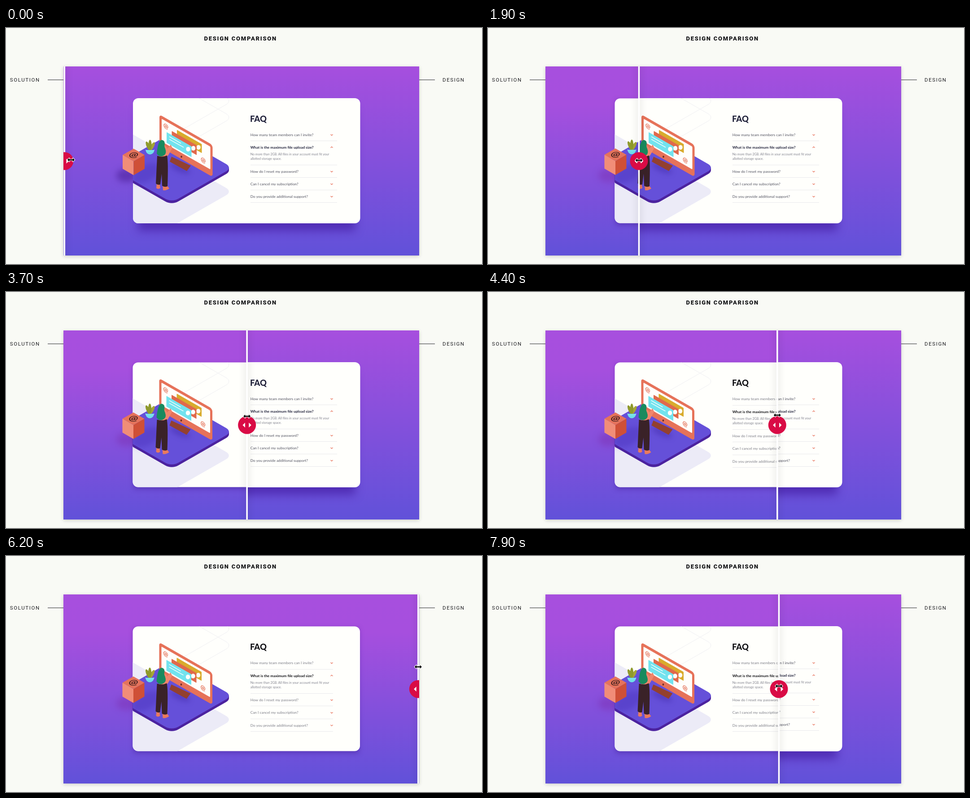
Write an HTML page with a canvas that moves like this. It is 1061 px wide and 528 px high and loops after 8 s.

```html
<!DOCTYPE html>
<html lang="en">
<head>
<meta charset="utf-8">
<title>Design comparison</title>
<style>
  html, body { margin: 0; width: 100%; height: 100%; overflow: hidden; background: #f9faf5; }
  canvas { display: block; }
</style>
</head>
<body>
<canvas id="stage" width="1061" height="528"></canvas>
<script>
const LOOP = 8000, STEP = 100;
const BOX = { x: 128, y: 86, w: 793, h: 423 };
const SLOPE = 0.575; // isometric rise per pixel

// Drag path: time, slider x, pointer y
const DRAG = [
  [700, 130.3, 295], [1900, 336.5, 296], [2900, 456.2, 281.5], [3400, 491, 279],
  [4400, 644.8, 275.5], [5400, 860.4, 254.5], [6000, 918.8, 248], [6200, 918.8, 248], [7800, 648.5, 291]
];

const DESIGN = {
  inset: 0, rowStep: 28, ruleWidth: 193, flatTop: 0,
  shadow: { color: 'rgba(58,18,150,.55)', blur: 10, drop: 22 }, blob: 'rgba(72,30,150,.55)',
  title: '#1f2039', text: '#50515f'
};
const SOLUTION = {
  inset: 0.5, rowStep: 28.4, ruleWidth: 184, flatTop: 0.2,
  shadow: { color: 'rgba(50,15,130,.4)', blur: 6, drop: 5 }, blob: 'rgba(125,50,180,.5)',
  title: '#101014', text: '#7b7c86'
};
const QUESTIONS = [
  'How many team members can I invite?', 'What is the maximum file upload size?',
  'How do I reset my password?', 'Can I cancel my subscription?', 'Do you provide additional support?'
];
const ANSWER = ['No more than 2GB. All files in your account must fit your', 'allotted storage space.'];

const stage = document.getElementById('stage');

function layer() {
  const c = document.createElement('canvas');
  c.width = stage.width;
  c.height = stage.height;
  return c;
}

function poly(g, color, pts) {
  g.beginPath();
  pts.forEach(p => g.lineTo(...p));
  g.fillStyle = color;
  g.fill();
}

function path(g, d, fill, stroke, width = 1) {
  const p = new Path2D(d);
  if (fill) { g.fillStyle = fill; g.fill(p); }
  if (stroke) { g.strokeStyle = stroke; g.lineWidth = width; g.stroke(p); }
}

function oval(g, color, x, y, rx, ry = rx, turn = 0) {
  g.beginPath();
  g.ellipse(x, y, rx, ry, turn, 0, Math.PI * 2);
  g.fillStyle = color;
  g.fill();
}

function write(g, text, x, y, font, color, spacing = 0) {
  g.font = font;
  g.fillStyle = color;
  g.letterSpacing = spacing + 'px';
  g.fillText(text, x, y);
}

function blurred(g, radius, paint) {
  g.save();
  g.filter = `blur(${radius}px)`;
  paint();
  g.restore();
}

// Rounded square lying on the ground, placed by its right corner
function slab(x, y, size, r = 14) {
  const square = new Path2D(), p = new Path2D();
  square.roundRect(0, 0, size, size, r);
  p.addPath(square, new DOMMatrix([1, SLOPE, -1, SLOPE, x - size, y - size * SLOPE]));
  return p;
}

// Upright panel facing left
function panel(g, color, x, y, w, h, r = 1) {
  g.save();
  g.transform(1, SLOPE, 0, 1, x, y);
  g.beginPath();
  g.roundRect(0, 0, w, h, r);
  g.fillStyle = color;
  g.fill();
  g.restore();
}

function atSign(g, color, size, ...matrix) {
  g.save();
  g.transform(...matrix);
  g.textAlign = 'center';
  g.textBaseline = 'middle';
  write(g, '@', 0, 0, `bold ${size}px Lato, sans-serif`, color);
  g.restore();
}

function drawGround(g) {
  g.fillStyle = '#ecebf7';
  g.fill(slab(505, 366, 300));
  g.strokeStyle = '#eeeef1';
  for (const y of [200, 163]) g.stroke(slab(505, y, 300));
  g.fillStyle = '#4c239f';
  for (let d = 6; d > 0; d--) g.fill(slab(505, 312.5 + d, 135.5));
  g.fillStyle = '#6550d9';
  g.fill(slab(505, 312.5, 135.5));
  blurred(g, 6, () => {
    oval(g, 'rgba(70,45,180,.35)', 312, 325, 34, 18, -0.5);
    oval(g, 'rgba(60,35,160,.4)', 388, 314, 24, 8, 0.4);
  });
}

function drawMonitor(g) {
  poly(g, '#93402f', [[369, 288], [412, 308], [403, 320], [365, 299]]);
  panel(g, '#e67259', 342, 193.5, 118.5, 71.5, 6);
  panel(g, '#fffefb', 347, 203, 108.5, 51, 2);
  ['#d9ab2c', '#e0694c', '#72e3ee'].forEach((color, i) => {
    const x = 381 - i * 11.5;
    panel(g, color, x, 228 + i * 2.5, 55.5, 20 + i * 2);
    oval(g, '#fffefb', x + 48, 267 + i * 2, 4.7, 5.3);
  });
  path(g, 'M364 243 l26 15 M364 249 l32 18', null, '#e9fbfb', 1.6);
  oval(g, '#6b2c25', 391, 288, 1.8, 2.3);
  for (const [x, y] of [[356.3, 220], [439.5, 296]]) atSign(g, '#e2694f', 14, 0.95, 0.5, 0, 1, x, y);
}

function drawPlant(g) {
  for (const lean of [-0.4, 0.5, 0]) {
    const reach = 12 - Math.abs(lean) * 3;
    oval(g, lean > 0 ? '#a5a637' : '#8f9a2c', 321 + Math.sin(lean) * reach, 274 - Math.cos(lean) * reach, 3.6, reach, lean);
  }
  path(g, 'M311.5 273 A9.5 10 0 0 0 330.5 273 Z', '#6fdfe9');
  path(g, 'M311.5 272.5 A9.5 3 0 0 0 330.5 272.5', null, '#8aeaf1', 1.4);
}

function drawWoman(g) {
  path(g, 'M336 347 h6 l2 11 q-5 4 -9 0 Z M349 351 h9 l6 8 q-6 5 -14 4 Z', '#e97a5e');
  path(g, 'M350 263 q8 1 10 7 l7 -9 l4 7 l-9 16 l-5 6 h-16 Z', '#f0866c');
  path(g, 'M337 286 Q349 290 359 285 Q362 300 360 354 Q354 357 348 353 L347 326 L344 350 Q338 352 334 348 Z', '#3a2228');
  path(g, 'M347 250.5 Q354 251 354 259 Q352 264 355 270 Q359 281 352 285 Q343 291 336 281 Q339 251 347 250.5 Z', '#198a5e');
}

function drawCube(g, x, y, half, height) {
  const mid = y + half * SLOPE, front = y + 2 * half * SLOPE;
  poly(g, '#e5735b', [[x, y], [x + half, mid], [x, front], [x - half, mid]]);
  for (const [side, color] of [[-1, '#f18d78'], [1, '#cf5037']]) {
    const edge = x + side * half;
    poly(g, color, [[edge, mid], [x, front], [x, front + height], [edge, mid + height]]);
  }
  atSign(g, '#40201f', 25, 1, 0, -0.12, 0.62, x, mid);
}

function drawFaq(g, s) {
  write(g, 'FAQ', 544, 210, '800 18.5px Lato, sans-serif', s.title);
  let y = 239 + s.inset / 2;
  QUESTIONS.forEach((question, i) => {
    const open = i === 1, d = open ? -1 : 1;
    write(g, question, 544.7, y + 3, `${open ? 'bold' : 'normal'} 8.3px Lato, sans-serif`, open ? s.title : s.text);
    path(g, `M723.5 ${y - d} l2.5 ${2.3 * d} l2.5 ${-2.3 * d}`, null, '#e97b65', 1.3);
    if (open) {
      ANSWER.forEach((line, j) => write(g, line, 544.7, y + 18 + j * 10, '7.08px Lato, sans-serif', '#82838f'));
      y += 26;
    }
    g.fillStyle = '#e9e9ec';
    g.fillRect(545, Math.round(y + 13.4), s.ruleWidth, 1);
    y += s.rowStep;
  });
}

function buildScene(s) {
  const c = layer(), g = c.getContext('2d');
  const fill = g.createLinearGradient(0, BOX.y, 0, BOX.y + BOX.h);
  fill.addColorStop(0, '#a74fde');
  fill.addColorStop(s.flatTop, '#a64fde');
  fill.addColorStop(1, '#6151d9');
  g.fillStyle = fill;
  g.fillRect(BOX.x, BOX.y, BOX.w, BOX.h);

  const x = 283 - s.inset, y = 157 + s.inset, w = 506.5, h = 280 - 2 * s.inset;
  const card = new Path2D();
  card.roundRect(x, y, w, h, 12);
  const { color, blur, drop } = s.shadow;
  blurred(g, 7, () => oval(g, s.blob, 268, 330, 22, 15));
  blurred(g, blur, () => {
    g.fillStyle = color;
    g.fillRect(x + drop / 2, y + drop, w - drop, h - drop / 4);
  });
  g.fillStyle = '#fffffc';
  g.fill(card);

  g.save();
  g.clip(card);
  drawGround(g);
  g.restore();

  g.save();
  g.translate(-s.inset, -s.inset);
  drawMonitor(g);
  drawPlant(g);
  drawWoman(g);
  drawCube(g, 284.5, 270, 24.5, 31);
  g.restore();
  drawFaq(g, s);
  return c;
}

function buildPage() {
  const c = layer(), g = c.getContext('2d');
  const label = '11.4px Roboto, sans-serif';
  g.fillStyle = '#f9faf5';
  g.fillRect(0, 0, c.width, c.height);
  write(g, 'DESIGN COMPARISON', 441.5, 28, '900 13px Roboto, sans-serif', '#131316', 1.75);
  write(g, 'SOLUTION', 8.8, 120, label, '#1c1c20', 1.65);
  write(g, 'DESIGN', 973, 120, label, '#1c1c20', 1.65);
  g.fillStyle = '#5c5c60';
  for (const x of [93, 921]) g.fillRect(x, 115.3, 35, 1.4);
  g.shadowColor = 'rgba(0,0,0,.18)';
  g.shadowBlur = 8;
  g.shadowOffsetY = 2;
  g.fillRect(BOX.x, BOX.y, BOX.w, BOX.h);
  return c;
}

function drawSlider(g, x) {
  const y = 297.7;
  g.save();
  g.shadowColor = 'rgba(0,0,0,.25)';
  g.shadowBlur = 16;
  g.fillStyle = '#fff';
  g.fillRect(x - 1.75, BOX.y - 20, 3.5, BOX.h + 40);
  g.restore();
  oval(g, '#d90b45', x, y, 20);
  for (const d of [-1, 1]) poly(g, '#fff', [[x + d * 4.2, y - 5.5], [x + d * 9.7, y], [x + d * 4.2, y + 5.5]]);
}

function drawPointer(g, x, y) {
  g.save();
  g.translate(x, y);
  g.lineJoin = 'round';
  const arrows = 'M-8 0 L-4 -4 V-1.2 H4 V-4 L8 0 L4 4 V1.2 H-4 V4 Z';
  path(g, arrows, null, '#fff', 2.2);
  path(g, arrows, '#000');
  g.restore();
}

function dragAt(t) {
  const next = DRAG.findIndex(key => key[0] > t);
  if (next === 0) return DRAG[0];
  if (next < 0) return DRAG[DRAG.length - 1];
  const a = DRAG[next - 1], b = DRAG[next];
  const u = (t - a[0]) / (b[0] - a[0]);
  return a.map((v, i) => v + (b[i] - v) * u);
}

const ctx = stage.getContext('2d');
const page = buildPage(), design = buildScene(DESIGN), solution = buildScene(SOLUTION);

function draw(t) {
  const [, x, pointerY] = dragAt(Math.floor(t / STEP) * STEP);
  ctx.drawImage(page, 0, 0);
  ctx.drawImage(design, 0, 0);
  ctx.save();
  ctx.beginPath();
  ctx.rect(BOX.x, BOX.y, BOX.w, BOX.h);
  ctx.clip();
  ctx.save();
  ctx.beginPath();
  ctx.rect(BOX.x, BOX.y, x - BOX.x, BOX.h);
  ctx.clip();
  ctx.drawImage(solution, 0, 0);
  ctx.restore();
  drawSlider(ctx, x);
  ctx.restore();
  drawPointer(ctx, Math.max(x, 145), pointerY);
}

const start = performance.now();
function tick() {
  draw((performance.now() - start) % LOOP);
  requestAnimationFrame(tick);
}
tick();
</script>
</body>
</html>
```
